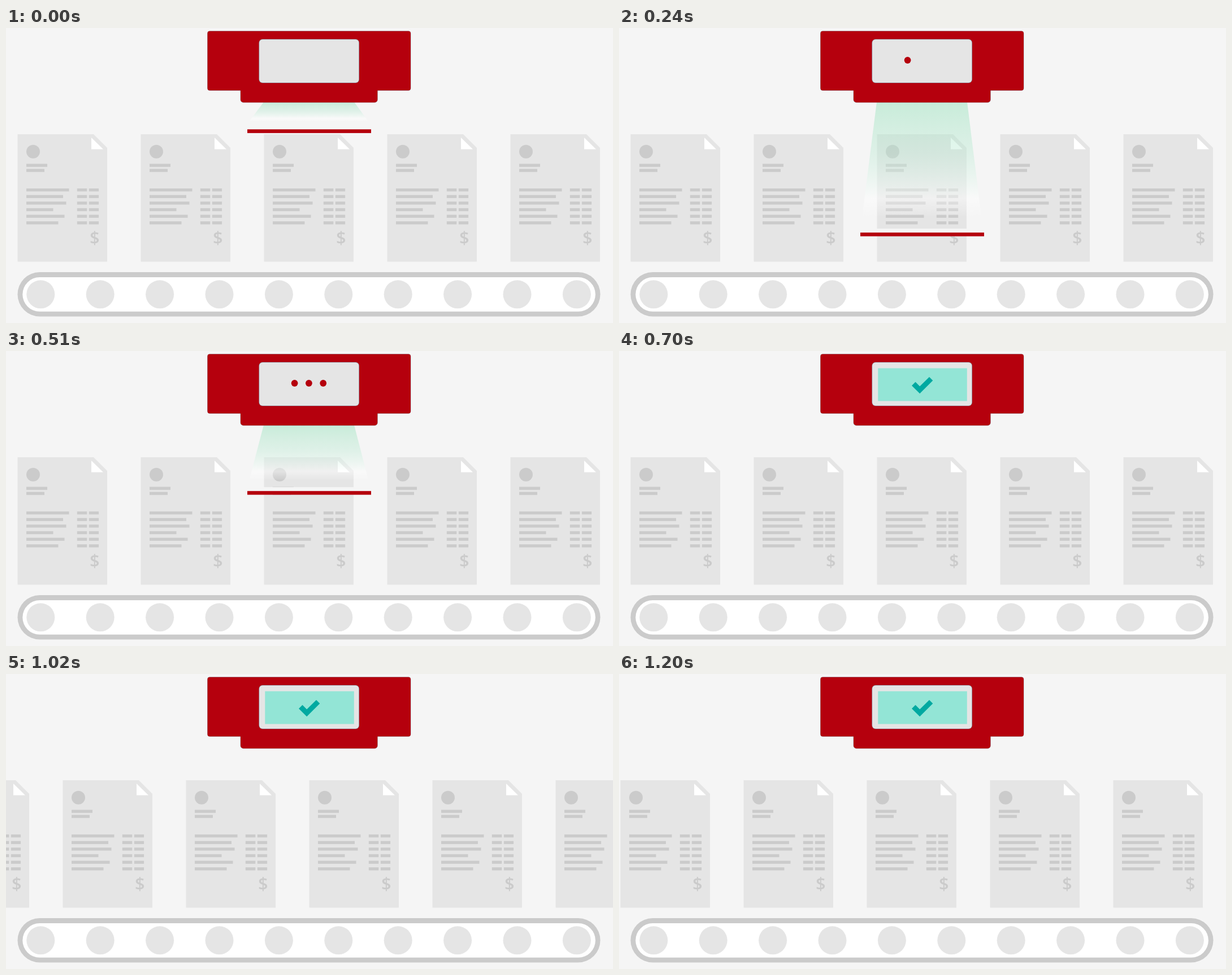
These frames come from a looping animation (1074x522 px, 1.23 s). An HTML page with a canvas:

```html
<!DOCTYPE html>
<html lang="en">
<head>
<meta charset="utf-8">
<title>Document scanner</title>
<style>
html, body { margin: 0; width: 100%; height: 100%; overflow: hidden; background: #f5f5f5; }
canvas { display: block; }
</style>
</head>
<body>
<canvas id="stage" width="1074" height="522"></canvas>
<script>
const ctx = document.getElementById('stage').getContext('2d');
const LOOP = 1230, STEP = 30;
const BG = '#f5f5f5', PAPER = '#e5e5e5', INK = '#cbcbcb', RED = '#b5000d';
const PITCH = 218;
const ROW_WIDTHS = [75.5, 65, 70.5, 47.5, 67.5, 56.5];

function box(x, y, w, h, color) {
  ctx.fillStyle = color;
  ctx.fillRect(x, y, w, h);
}

function rounded(x, y, w, h, radius, color) {
  ctx.fillStyle = color;
  ctx.beginPath();
  ctx.roundRect(x, y, w, h, radius);
  ctx.fill();
}

function disc(x, y, r, color) {
  ctx.fillStyle = color;
  ctx.beginPath();
  ctx.arc(x, y, r, 0, Math.PI * 2);
  ctx.fill();
}

function polygon(points, color) {
  ctx.fillStyle = color;
  ctx.beginPath();
  points.forEach(([x, y]) => ctx.lineTo(x, y));
  ctx.closePath();
  ctx.fill();
}

function drawPaper(x) {
  ctx.save();
  ctx.translate(x, 188);
  polygon([[0, 0], [134.5, 0], [158.5, 24], [158.5, 225.5], [0, 225.5]], PAPER);
  polygon([[130.5, 6], [130.5, 26.5], [151.5, 26.5]], '#fff');
  disc(27.5, 30.8, 12, INK);
  box(15.5, 52.4, 37, 5.3, INK);
  box(15.5, 61.4, 32, 5.3, INK);
  ROW_WIDTHS.forEach((w, i) => {
    const y = 95.9 + i * 11.65;
    box(15.5, y, w, 5.3, INK);
    box(105.3, y, 17.5, 5.3, INK);
    box(126.3, y, 17.3, 5.3, INK);
  });
  ctx.fillStyle = INK;
  ctx.font = '600 31px "Open Sans", sans-serif';
  ctx.textAlign = 'center';
  ctx.fillText('$', 136.3, 194);
  ctx.restore();
}

function drawConveyor() {
  rounded(20.5, 432, 1031, 78.5, 39.25, INK);
  rounded(29.3, 441, 1013.6, 60.8, 30.4, '#fff');
  for (let i = 0; i < 10; i++) disc(61.3 + i * 105.4, 471.3, 25, PAPER);
}

function drawScan(lineY) {
  const bottom = 165 + (lineY - 182.6) * 0.915;
  const glow = ctx.createLinearGradient(0, 131, 0, bottom);
  glow.addColorStop(0, 'rgba(146,224,184,.46)');
  glow.addColorStop(0.45, 'rgba(180,233,207,.36)');
  glow.addColorStop(0.85, 'rgba(255,255,255,.45)');
  glow.addColorStop(1, 'rgba(255,255,255,.05)');
  polygon([[456, 131], [616, 131], [641, bottom], [430.5, bottom]], glow);
  box(456, lineY - 10.2, 159.5, 7, BG);
  box(427, lineY - 3.3, 219, 6.6, RED);
}

function drawHead() {
  ctx.beginPath();
  ctx.roundRect(356.5, 5.5, 359.5, 105, 4);
  ctx.roundRect(415, 100, 242.3, 31.7, [0, 0, 5, 5]);
  ctx.strokeStyle = 'rgba(60,120,140,.5)';
  ctx.lineWidth = 1;
  ctx.stroke();
  ctx.fillStyle = RED;
  ctx.fill();
  rounded(447.8, 20, 176.8, 77, 6, PAPER);
  ctx.strokeStyle = 'rgba(90,165,190,.45)';
  ctx.stroke();
}

function drawResult(alpha) {
  ctx.globalAlpha = alpha;
  box(458.3, 30.5, 157.5, 58, '#93e5d6');
  polygon([[518, 61.3], [524.5, 54.8], [532.2, 62.6], [549, 46], [555.3, 52.2], [532.2, 75.3]], '#00a9a1');
  ctx.globalAlpha = 1;
}

function draw(time) {
  const step = Math.floor(time / STEP);
  const scanning = time < 630;
  const shift = time < 930 ? 0 : 20 * (step - 30);

  box(0, 0, 1074, 522, BG);
  for (let i = -1; i < 5; i++) drawPaper(20.5 + i * PITCH + shift);
  drawConveyor();
  // The bar goes down for ten steps and back up for ten.
  if (scanning) drawScan(182.6 + 22.83 * (10 - Math.abs(step - 10)));
  drawHead();
  if (scanning) {
    const dots = Math.min(3, Math.floor(time / 150));
    for (let i = 0; i < dots; i++) disc(510.6 + i * 25.3, 57, 5.9, RED);
  } else {
    drawResult(time < 700 ? 0.5 : 1);
  }
}

const start = performance.now();
function tick() {
  draw((performance.now() - start) % LOOP);
  requestAnimationFrame(tick);
}
tick();
</script>
</body>
</html>
```
